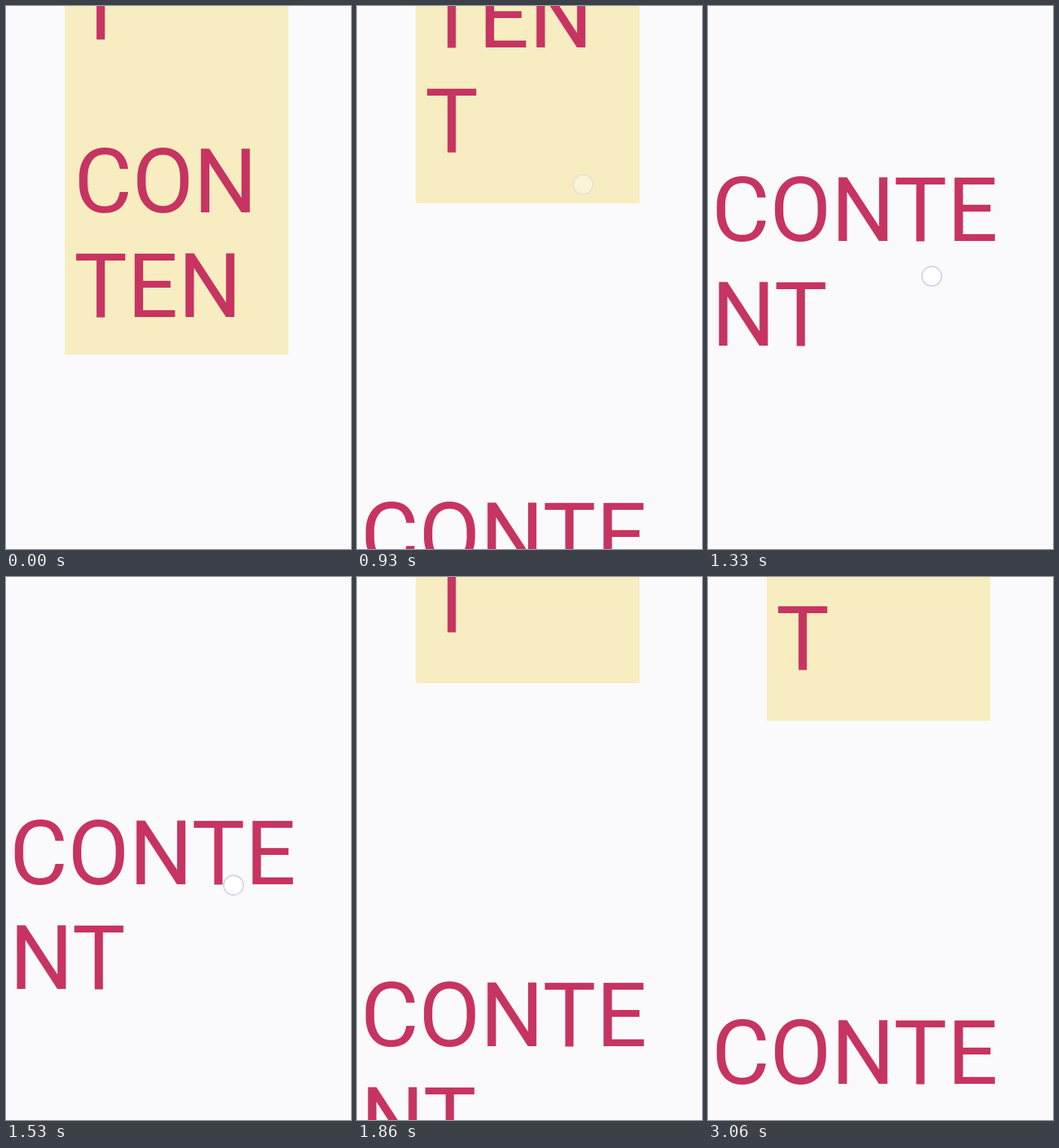
An HTML page for the animation above (3.83 s loop, 458 by 721 pixels).

```html
<!DOCTYPE html>
<html lang="en">
<head>
<meta charset="utf-8">
<title>Nested scrolling</title>
<style>
  html, body { margin: 0; width: 100%; height: 100%; overflow: hidden; background: #fafafc; }
  #stage { display: block; width: 458px; height: 721px; }
  text { font: 400 118.7px Roboto, sans-serif; fill: #c73461; }
  #panel { overflow: hidden; }
  #touch { fill: rgba(255, 255, 255, .85); stroke: #d5d3e9; stroke-width: 2; }
</style>
</head>
<body>
<svg id="stage" viewBox="0 0 458 721">
  <svg id="panel" x="78" width="297" height="800">
    <rect width="297" height="800" fill="#f8edc1"/>
    <g id="list"></g>
  </svg>
  <g id="page"></g>
  <circle id="touch" r="13"/>
</svg>
<script>
const LOOP = 3830, FPS = 15, LINE = 139;
const PANEL_H = 800, INNER = 157, ITEM_PITCH = 508;
const $ = id => document.getElementById(id);

function addLines(parent, lines, x, lastBaseline) {
  lines.forEach((line, i) => {
    const el = document.createElementNS('http://www.w3.org/2000/svg', 'text');
    el.setAttribute('x', x);
    el.setAttribute('y', lastBaseline - (lines.length - 1 - i) * LINE);
    el.textContent = line;
    parent.append(el);
  });
}

const listEnd = PANEL_H - 68.4;
for (const up of [0, ITEM_PITCH]) addLines($('list'), ['CON', 'TEN', 'T'], 12.2, listEnd - up);
addLines($('page'), ['CONTE', 'NT'], 4.7, LINE - .4);

const speedUp = u => u ** 2;
const slowDown = u => 1 - (1 - u) ** 2.05;

// Total scroll distance; the list uses the first INNER pixels, the page the rest
const phases = [
  { end: 8, to: 0 },
  { end: 14, to: 358, ease: speedUp },    // drag up
  { end: 18, to: 790, ease: slowDown },   // fling
  { end: 20, to: 790 },                   // held
  { end: 23, to: 694, ease: speedUp },    // drag down
  { end: 32, to: 429, ease: slowDown },   // fling
];

function scrollAt(step) {
  const i = phases.findIndex(p => step <= p.end);
  if (i < 0) return phases[phases.length - 1].to;
  if (i === 0) return 0;
  const a = phases[i - 1], b = phases[i];
  if (!b.ease) return b.to;
  return a.to + (b.to - a.to) * b.ease((step - a.end) / (b.end - a.end));
}

const touches = [
  { from: 9, to: 14, at: (n, scroll) => [280 + 4 * n, 595 - scroll] },
  { from: 17, to: 24, at: n => [292 + n * 5 / 3, 384 - 21 * n + 4.2 * n * n] },
];

function drawTouch(step, scroll) {
  const touch = touches.find(g => step >= g.from && step <= g.to);
  const el = $('touch');
  el.setAttribute('opacity', !touch ? 0 : step === touch.to ? .45 : 1);
  if (!touch) return;
  const [x, y] = touch.at(step - touch.from, scroll);
  el.setAttribute('cx', x);
  el.setAttribute('cy', y);
}

function draw(t) {
  // Frame delays are whole hundredths of a second
  const step = Math.floor((Math.floor(t / 10) * 10 + 9.99) * FPS / 1000);
  const scroll = scrollAt(step);
  const inner = Math.min(scroll, INNER);
  const bottom = Math.round(463 - (scroll - inner));
  $('panel').setAttribute('y', bottom - PANEL_H);
  $('list').setAttribute('transform', `translate(0 ${INNER - inner})`);
  $('page').setAttribute('transform', `translate(0 ${bottom + 482})`);
  drawTouch(step, scroll);
}

const start = performance.now();
function tick() {
  draw((performance.now() - start) % LOOP);
  requestAnimationFrame(tick);
}
tick();
</script>
</body>
</html>
```
